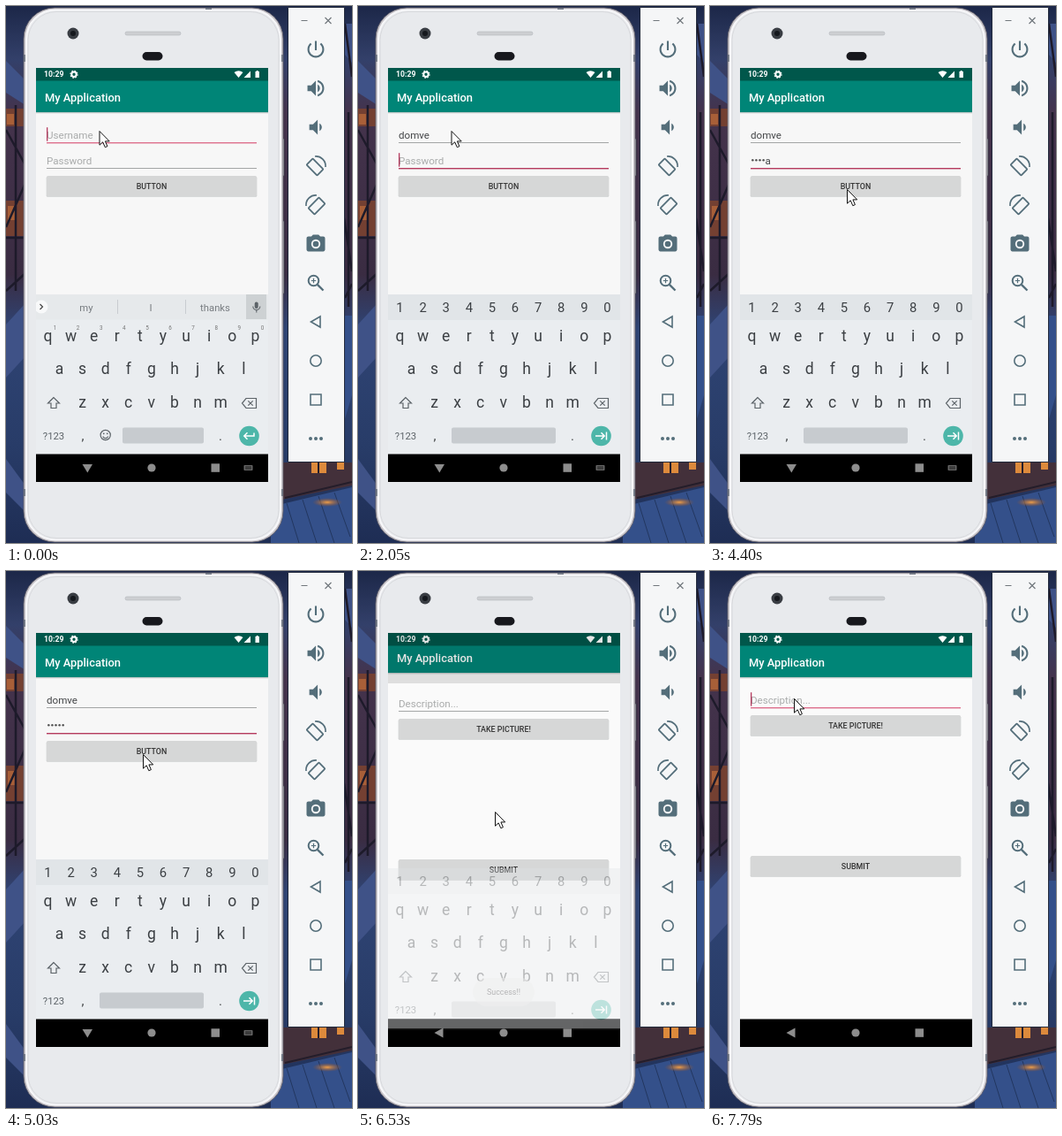
These frames come from a looping animation (392x607 px, 8000 ms). An HTML page:

```html
<!DOCTYPE html>
<html lang="en">
<head>
<meta charset="utf-8">
<title>Login form</title>
<style>
html, body { margin: 0; width: 100%; height: 100%; overflow: hidden; background: #1b2748; }
svg { display: block; }
text { font-family: Roboto, Arial, sans-serif; white-space: pre; }
</style>
</head>
<body>
<svg width="392" height="607" viewBox="0 0 392 607">
  <defs>
    <linearGradient id="night" x2="0" y2="1">
      <stop offset="0" stop-color="#1c2748"/><stop offset=".1" stop-color="#33406a"/>
      <stop offset=".2" stop-color="#44334c"/><stop offset=".5" stop-color="#3a2c42"/>
      <stop offset=".6" stop-color="#2f4474"/><stop offset=".82" stop-color="#283c68"/>
      <stop offset="1" stop-color="#1e2d54"/>
    </linearGradient>
    <radialGradient id="lamp"><stop offset="0" stop-color="#f0a04a"/><stop offset="1" stop-color="#a0501c" stop-opacity="0"/></radialGradient>
    <clipPath id="display"><path d="M34 70h263v468H34z"/></clipPath>
    <clipPath id="press"><path d="M46 192h238v23H46z"/></clipPath>
  </defs>

  <!-- blurred town at night -->
  <path fill="url(#night)" d="M0 0h392v607H0z"/>
  <path fill="#3f5287" d="M0 62l22 22v28L0 98zM0 360l22-24v60L0 420zM0 512l22 30v30L0 550zM383 20h9v44l-9-10z"/>
  <path fill="#744032" d="M0 116h22v20H0zM0 220h22v40H0z"/>
  <path fill="#a85f38" d="M1 122h8v12H1zM2 226h8v16H2z"/>
  <path stroke="#1d1a2a" stroke-width="2.500" fill="none" d="M0 140l22 40M22 200L0 250M11 112v210M0 262h22M0 322l22-20M384 20l8 60M388 120v220M383 240l9 60M384 330l8-16"/>
  <path fill="#34508a" d="M383 350h9v90l-9 30zM300 566l92-22v63H300z"/>
  <path stroke="#22365f" fill="none" d="M318 562l14 45M336 558l16 49M354 554l18 53M372 550l18 50"/>
  <path fill="#43303a" d="M312 516h80v26l-80 16z"/>
  <path fill="#dd8a3c" d="M346 514h17v14h-17zM375 516h8v8h-8z"/>
  <path stroke="#241d2a" stroke-width="2" d="M354 514v14M316 556l76-18"/>
  <ellipse cx="364" cy="561" rx="17" ry="5" fill="url(#lamp)"/>

  <!-- phone -->
  <path fill="#d4d7dc" stroke="#3a3f49" stroke-width=".7" d="M311 150h4v42h-4zM311 243h4v82h-4z"/>
  <rect x="20" y="2" width="294" height="604" rx="35" fill="#c9c6cb" stroke="#5b5963" stroke-width=".8"/>
  <rect x="23" y="4.500" width="288" height="599" rx="33" fill="#e8eaed" stroke="#f8f8fa" stroke-width="2"/>
  <rect x="25" y="6.500" width="284" height="595" rx="32" fill="none" stroke="#d3d5d9" stroke-width=".8"/>
  <path stroke="#737985" stroke-width="2" d="M226 3h7M21 55v8M313 55v8M21 546v8M313 546v8"/>
  <circle cx="76" cy="31" r="6.500" fill="#393d43"/><circle cx="76" cy="31" r="3" fill="#15181d"/>
  <rect x="135" y="29" width="63" height="4" rx="2" fill="#cdcfd2" stroke="#b3b6bb" stroke-width=".6"/>
  <rect x="154.500" y="52" width="23" height="9.500" rx="4.700" fill="#17181d"/>

  <g id="screen" clip-path="url(#display)"></g>

  <!-- emulator controls -->
  <path fill="#f5f6f7" stroke="#20283a" d="M319.500 1.500h64v514h-64z"/>
  <path stroke="#71777c" stroke-width="1.200" d="M334.500 16.500h7M361.500 13l7 7M368.500 13l-7 7"/>
  <g id="tools" fill="#546e7a"></g>

  <path id="mouse" d="M0 0V15.700L3.700 12.300L6.300 18.200L8.900 17.100L6.400 11.400H11.200Z" fill="#fff" stroke="#111" stroke-linejoin="round"/>
</svg>
<script>
const LOOP = 8000, TEAL = '#008577', PINK = '#dd6f8c', DEEP = '#b53a5e', INK = '#434547', RULE = '#8f9191';
const USER = 'domve', SECRET = 'nuwra';
const $ = id => document.getElementById(id);

const text = (x, y, str, size, fill, anchor = 'start', weight = 400) =>
  `<text x="${x}" y="${y}" font-size="${size}" fill="${fill}" text-anchor="${anchor}" font-weight="${weight}">${str}</text>`;
const box = (x, y, w, h, fill, r = 0) =>
  `<rect x="${x}" y="${y}" width="${w}" height="${h}" rx="${r}" fill="${fill}"/>`;
const line = (d, color, width = 1.2) =>
  `<path d="${d}" fill="none" stroke="${color}" stroke-width="${width}"/>`;
const disc = (x, y, r, fill) => `<circle cx="${x}" cy="${y}" r="${r}" fill="${fill}"/>`;
const shift = (y, body, opacity = 1) => `<g transform="translate(0 ${y})" opacity="${opacity}">${body}</g>`;

// Latest entry of [time, value] whose time has passed
const at = (list, t) => list.reduce((v, e) => t >= e[0] ? e[1] : v, list[0][1]);

function buildTools() {
  const turn = '<rect x="-5" y="-8.500" width="10" height="17" rx="1" transform="translate(-1 1) rotate(-45)" fill="none" stroke="#546e7a" stroke-width="1.800"/>' +
    line('M-1 -11A11 11 0 0 1 11 1', '#546e7a', 1.7);
  const mat = d => `<path transform="scale(1.05) translate(-12 -12)" d="${d}"/>`;
  const icons = [
    mat('M13 3h-2v10h2V3zm4.830 2.170l-1.420 1.420C17.990 7.860 19 9.810 19 12c0 3.870-3.130 7-7 7s-7-3.130-7-7c0-2.190 1.010-4.140 2.580-5.420L6.170 5.170C4.230 6.820 3 9.260 3 12c0 4.970 4.030 9 9 9s9-4.030 9-9c0-2.740-1.230-5.180-3.170-6.830z'),
    mat('M3 9v6h4l5 5V4L7 9H3zm13.500 3c0-1.770-1.020-3.290-2.500-4.030v8.050c1.480-.73 2.500-2.250 2.500-4.020zM14 3.230v2.060c2.890.86 5 3.540 5 6.710s-2.110 5.850-5 6.710v2.060c4.010-.91 7-4.490 7-8.770s-2.990-7.860-7-8.770z'),
    mat('M18.500 12c0-1.770-1.020-3.290-2.500-4.030v8.050c1.480-.73 2.500-2.250 2.500-4.020zM5 9v6h4l5 5V4L9 9H5z'),
    turn, `<g transform="scale(-1 1)">${turn}</g>`,
    mat('M9 2L7.170 4H4c-1.100 0-2 .9-2 2v12c0 1.100.9 2 2 2h16c1.100 0 2-.9 2-2V6c0-1.100-.9-2-2-2h-3.170L15 2z') +
      disc(0, 0, 5.2, '#f5f6f7') + disc(0, 0, 3.3, '#546e7a'),
    '<circle cx="-2.500" cy="-2.500" r="5.800" fill="none" stroke="#546e7a" stroke-width="2"/>' +
      line('M1.800 1.800L8.500 8.500', '#546e7a', 2.4) + line('M-5.200 -2.500h5.400M-2.500 -5.200v5.400', '#546e7a', 1.2),
    line('M5 -6V6L-5.500 0Z', '#546e7a', 1.6),
    '<circle r="6.200" fill="none" stroke="#546e7a" stroke-width="1.600"/>',
    line('M-6 -6H6V6H-6Z', '#546e7a', 1.6),
    [-6, 0, 6].map(x => disc(x, 0, 2, '#546e7a')).join('')
  ];
  return icons.map((icon, i) => `<g transform="translate(351 ${49 + 44 * i})">${icon}</g>`).join('');
}

function statusBar() {
  return box(34, 70, 263, 14.5, '#00574b') + text(43, 80.3, '10:29', 8.7, '#fff', 'start', 700) +
    '<circle cx="77" cy="77.300" r="2.700" fill="none" stroke="#fff" stroke-width="2"/>' +
    '<circle cx="77" cy="77.300" r="4" fill="none" stroke="#fff" stroke-width="1.200" stroke-dasharray="1.570"/>' +
    '<path fill="#fff" d="M258.500 75Q263.500 71.500 268.500 75L263.500 81ZM277 73.500V81H269.500ZM282.500 74h1.200v-1h2v1h1.200v7h-4.400z"/>';
}

function header() {
  return box(34, 84, 263, 36, TEAL) + box(34, 120, 263, 1, '#bfc8c7') + box(34, 121, 263, 1, '#e6e8e8') +
    text(44, 107.5, 'My Application', 12.9, '#fff', 'start', 500) + statusBar();
}

function button(y, label) {
  return box(45.7, y + .8, 238.6, 23, '#cdcfcf', 1.5) + box(46, y, 238, 23, '#d6d7d7', 1.5) +
    text(165, y + 15, label, 8.9, '#333', 'middle', 500);
}

// A text field; caret is its x, or 0 when not drawn
function field(base, value, hint, underline, caret) {
  return text(46, base, value || hint, 11.6, value ? INK : '#a9abab') +
    box(46, base + 4.3, 238, underline === RULE ? .8 : 1.4, underline) +
    (caret ? box(caret, base - 12.5, 1.3, 15.5, DEEP) : '');
}

const dots = n => Array.from({ length: n }, (_, i) => disc(48.3 + 4.1 * i, 174.3, 1.25, '#555')).join('');

function secretField(t) {
  const n = at([[0, 0], [2790, 1], [2940, 2], [3060, 3], [3180, 4], [3450, 5]], t);
  const active = t >= 1930, hidden = t >= 5030;
  const blink = active && at([[0, 1], [2480, 0], [2790, 1], [3980, 0], [4520, 1], [5030, 0]], t);
  const ends = [46, 53, 57, 64, 64.5, 68];
  return field(178.7, n ? ' ' : '', 'Password', active ? DEEP : RULE, blink ? ends[n] : 0) +
    (n ? dots(hidden ? n : n - 1) : '') +
    (n && !hidden ? text(46 + 4.1 * (n - 1), 178.7, SECRET[n - 1], 11.6, INK) : '');
}

function login(t) {
  const n = at([[0, 0], [270, 1], [1100, 2], [1350, 3], [1470, 4], [1780, 5]], t);
  const blink = t < 1930 && at([[0, 1], [120, 0], [270, 1], [700, 0], [1100, 1]], t);
  const ripple = at([[0, 0], [4520, 97], [4670, 240], [4790, 0]], t);
  return box(34, 70, 263, 468, '#f7f7f7') + header() +
    field(149.7, USER.slice(0, n), 'Username', t < 1930 ? PINK : RULE, blink ? [46, 52.5, 58.5, 68.5, 74, 80][n] : 0) +
    secretField(t) + button(192, 'BUTTON') +
    (ripple ? `<circle cx="155" cy="207" r="${ripple}" fill="#000" opacity=".12" clip-path="url(#press)"/>` : '');
}

function report(t) {
  const focus = t >= 7670;
  return box(34, 122, 263, 416, '#fafafa') +
    field(149.7, '', 'Description...', focus ? PINK : RULE, focus ? 46 : 0) +
    button(163, 'TAKE PICTURE!') + button(322, 'SUBMIT');
}

function suggestions(t) {
  const words = at([[0, ['my', 'I', 'thanks']], [270, ['day', 'do', 'did']], [1100, ["don't", 'do', 'does']],
    [1350, ['dome', 'dom', 'domain']], [1470, ['dome', 'domv', 'move']], [1780, ['dome', USER, 'move']]], t);
  return box(34, 326, 263, 28.5, '#e6e9eb') + disc(40, 340, 7.5, '#f8f9fa') +
    line('M38.500 337l3 3l-3 3', '#444', 1.2) +
    words.map((w, i) => text([91, 164, 237][i], 344.5, w, 11.3, '#777c80', 'middle')).join('') +
    line('M126.500 332v16M203.500 332v16', '#c8ccd0', 1) + box(272, 326, 23, 28, '#cdd1d3') +
    box(281.7, 334.5, 4, 7.5, '#5c6368', 2) + line('M279.800 339.500a4 4 0 0 0 8 0M283.800 343.500v3', '#5c6368', 1.1);
}

function keyboard(t) {
  const digits = [...'1234567890'], numeric = t >= 1930, keyX = i => 47.5 + 26.1 * i;
  const row = (chars, x, y, size = 17.5) =>
    [...chars].map((c, i) => text(x + 26.1 * i, y, c, size, '#3b3f43', 'middle')).join('');
  const space = numeric ? 106 : 132;
  return box(34, 326, 263, 181, '#eaedf0') +
    (numeric ? box(34, 326, 263, 29, '#e1e5e8') + row(digits, 47.5, 346.3, 14.8)
      : suggestions(t) + digits.map((d, i) => text(keyX(i) + 8, 366, d, 6.3, '#777', 'middle')).join('')) +
    row('qwertyuiop', 47.5, 378.7) + row('asdfghjkl', 60.5, 416.3) + row('zxcvbnm', 86.5, 454) +
    line('M54 442.500l-6.500 6.500h3.500v5.500h6V449h3.500Z', '#5c6368', 1.2) +
    line('M272 443.500h11.500v11H272l-4.500-5.500ZM274.300 446.300l5.400 5.400M279.700 446.300l-5.400 5.400', '#5c6368', 1.2) +
    text(54, 490, '?123', 11.3, '#5c6368', 'middle') + text(87, 491, ',', 15, INK, 'middle') + text(243, 491, '.', 15, INK, 'middle') +
    (numeric ? '' : '<circle cx="112.700" cy="485" r="5.600" fill="none" stroke="#5c6368" stroke-width="1.200"/>' +
      disc(110.7, 483.3, .9, '#5c6368') + disc(114.7, 483.3, .9, '#5c6368') + line('M109.700 486.500a3.200 3.200 0 0 0 6 0', '#5c6368', 1.1)) +
    box(space, 476.5, 224 - space, 18, '#c7cbcf', 2) + disc(275.5, 486, 11.3, '#4db6a9') +
    line(numeric ? 'M269 486h10M275.500 482.300l3.700 3.700l-3.700 3.700M281.500 481.500v9' : 'M281 482.500v3.500h-11M273.500 482.300l-3.700 3.700l3.700 3.700', '#fff', 1.5);
}

function navIcons(open) {
  const grey = '#8d8d8d';
  return disc(165, 522, 4.6, grey) + box(232.5, 517.3, 9.5, 9.5, grey) +
    `<path fill="${grey}" d="${open ? 'M86.500 518h11.500l-5.700 9.500z' : 'M96.500 516.500v11l-10-5.500z'}"/>` +
    (open ? box(269.5, 519, 10, 6, '#666', .8) + line('M271 521h7M271 523h7', '#000', .8) : '');
}

const navigation = open => box(34, 506.5, 263, 32, '#000') + navIcons(open);

function toast(t) {
  const alpha = at([[0, 0], [6530, .5], [6680, 1], [7190, .6], [7310, .2], [7430, 0]], t);
  return shift(0, box(130, 460, 70, 32, '#f0f0f0', 16) + text(165, 479.3, 'Success!!', 8.9, '#777', 'middle'), alpha);
}

// The second page slides up over the dimmed first one
function transition(t) {
  const [lift, edge, rise, drop, fade] = t < 6530 ? [-3, 158, 13, 3.5, .93] : [-5, 127, 4, 10, .35];
  return shift(lift, login(t).replaceAll(DEEP, RULE)) + statusBar() + box(34, 70, 263, 468, 'rgba(0,0,0,.1)') +
    `<clipPath id="reveal"><path d="M34 ${edge}h263V538H34z"/></clipPath><g clip-path="url(#reveal)">${shift(rise, report(t))}</g>` +
    box(34, 506.5, 263, 32, '#000') + box(34, 506.5, 263, 12, '#1b1b1b') +
    shift(drop, keyboard(t), fade) + toast(t) + navIcons(false);
}

function phoneScreen(t) {
  if (t < 6410) return login(t) + keyboard(t) + navigation(true);
  if (t < 6680) return transition(t);
  return header() + report(t) + navigation(false) + toast(t);
}

const route = [[0, [106, 141.5]], [4130, [121, 171.5]], [4250, [138, 200.5]], [4400, [155.5, 207.5]], [5720, [155.5, 225.5]],
  [5870, [155.5, 272.5]], [6920, null], [7070, [160.5, 255.5]], [7190, [150, 236]], [7310, [133, 204]],
  [7430, [113, 168]], [7550, [99, 148]], [7670, [95.5, 144.5]]];

let shown = '';
function draw(now) {
  const t = now % LOOP, markup = phoneScreen(t), tip = at(route, t);
  if (markup !== shown) $('screen').innerHTML = shown = markup;
  $('mouse').setAttribute('visibility', tip ? 'visible' : 'hidden');
  if (tip) $('mouse').setAttribute('transform', `translate(${tip})`);
}

$('tools').innerHTML = buildTools();
const start = performance.now();
(function tick() {
  draw(performance.now() - start);
  requestAnimationFrame(tick);
})();
</script>
</body>
</html>
```
